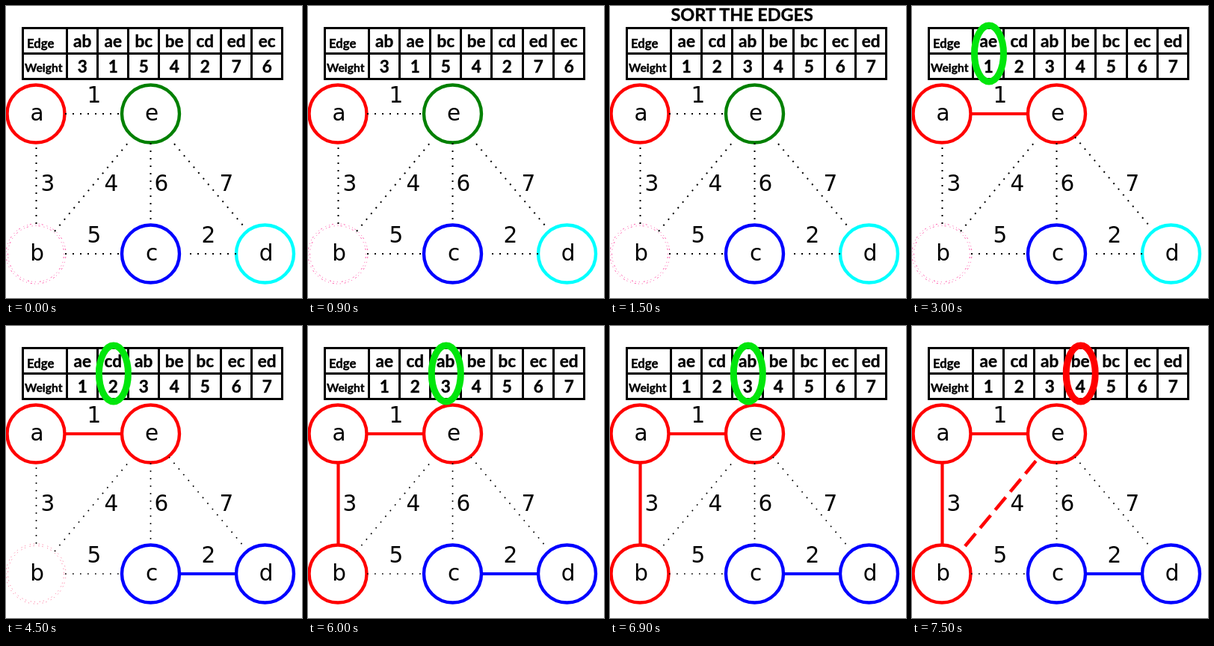
Write an HTML page that moves like this. It is 396 px wide and 390 px high and loops after 8000 ms.

```html
<!DOCTYPE html>
<html lang="en">
<head>
<meta charset="utf-8">
<title>Minimum spanning tree</title>
<style>
  html, body { margin: 0; width: 100%; height: 100%; overflow: hidden; background: #fff; }
  svg { display: block; width: 396px; height: 390px; }
  text { fill: #000; text-anchor: middle; }
  .table text { font: bold 22.5px Lato, "Open Sans", sans-serif; stroke: #000; stroke-width: .4; }
  .table .head { text-anchor: start; }
  .table .title { font-size: 23.4px; }
  .graph text { font: 29.5px "DejaVu Sans", sans-serif; }
  .grid { fill: none; stroke: #000; stroke-width: 3; }
  .node { fill: none; stroke-width: 4.4; }
  .dots { stroke: #000; stroke-width: 2; stroke-dasharray: 2 8; }
  .thin { stroke-width: 1.7; stroke-dasharray: 1.7 8.3; }
  .solid { stroke-width: 4.2; }
  .dashed { stroke: red; stroke-width: 4.5; stroke-dasharray: 22 9.5; }
  .ring { fill: none; stroke-width: 9; }
</style>
</head>
<body>
<svg id="stage" viewBox="0 0 396 390"></svg>
<script>
const LOOP = 8000, STEP = 1500;
const stage = document.getElementById('stage');

const weights = { ab: 3, ae: 1, bc: 5, be: 4, cd: 2, ed: 7, ec: 6 };
const listed = Object.keys(weights);
const sorted = [...listed].sort((p, q) => weights[p] - weights[q]);

const nodes = { a: [40, 144], e: [193.5, 144], b: [40, 331], c: [193.5, 331], d: [346.5, 331] };
const edges = {
  ae: { line: [79, 144, 155, 144], label: [118, 128.5] },
  ab: { line: [40.5, 189, 40.5, 294], label: [56, 247] },
  be: { line: [65, 301, 164, 182], label: [141, 247] },
  ec: { line: [193.5, 183, 193.5, 293], label: [208, 247] },
  ed: { line: [225, 184, 317, 293], label: [295, 247] },
  bc: { line: [79, 331, 155, 331], label: [118, 316] },
  cd: { line: [246, 331, 309, 331], label: [271, 316] }
};
// Step at which an edge joins the tree, with its full line
const joins = {
  ae: { at: 2, color: 'red', line: [79, 144, 155, 144] },
  cd: { at: 3, color: 'blue', line: [232, 331, 308, 331] },
  ab: { at: 4, color: 'red', line: [40.5, 182, 40.5, 293] }
};

const text = (x, y, s, attrs = '') => `<text x="${x}" y="${y}" ${attrs}>${s}</text>`;
const line = ([x1, y1, x2, y2], attrs) =>
  `<line x1="${x1}" y1="${y1}" x2="${x2}" y2="${y2}" ${attrs}/>`;
const circle = ([x, y], r, attrs) => `<circle cx="${x}" cy="${y}" r="${r}" ${attrs}/>`;
const columnX = i => Math.floor(81 + i * 41.2) + 0.5;

function table(step) {
  let grid = 'M22.5 29.5H369.5V97.5H22.5ZM22.5 63.5H369.5', cells = '';
  (step ? sorted : listed).forEach((edge, i) => {
    const mid = columnX(i) + 20.7;
    grid += `M${columnX(i)} 29.5V97.5`;
    cells += text(mid, 54.5, edge) + text(mid, 88.7, weights[edge]);
  });
  const title = step === 1 ? text(176.7, 20, 'SORT THE EDGES', 'class="title"') : '';
  return `<g class="table"><path class="grid" d="${grid}"/>${title}` +
    text(28, 56, 'Edge', 'class="head" style="font-size:16.8px"') +
    text(25, 87.5, 'Weight', 'class="head" style="font-size:15.6px"') + cells + '</g>';
}

function edgeLine(name, step) {
  const join = joins[name];
  if (join && step >= join.at) return line(join.line, `class="solid" stroke="${join.color}"`);
  if (name === 'be' && step === 5) return line([71, 294, 166, 180], 'class="dashed"');
  const ends = name === 'ed' && step >= 2 ? [218, 175, 317, 293] : edges[name].line;
  return line(ends, `class="dots${step >= 3 ? ' thin' : ''}"`);
}

function speckledNode(step) {
  const look = step < 3 ? ['#ff4fa6', '1 3 2 5 1 4'] : ['#ff5c8a', '1 4 1 6'];
  return [37.5, 40].map(r => circle(nodes.b, r,
    `fill="none" stroke="${look[0]}" stroke-width="1" stroke-dasharray="${look[1]}"`)).join('');
}

function graph(step) {
  const colors = {
    a: 'red',
    e: step < 2 ? 'green' : 'red',
    b: step < 4 ? null : 'red',
    c: 'blue',
    d: step < 3 ? 'cyan' : 'blue'
  };
  let out = '';
  for (const [name, at] of Object.entries(nodes)) {
    out += colors[name] ? circle(at, 38.5, `class="node" stroke="${colors[name]}"`) : speckledNode(step);
    out += text(at[0] + 1.5, at[1] + 9, name);
  }
  for (const [name, { label }] of Object.entries(edges)) {
    out += edgeLine(name, step) + text(...label, weights[name]);
  }
  return `<g class="graph">${out}</g>`;
}

function marker(step) {
  if (step < 2) return '';
  const x = 103 + (step - 2) * 40.9;
  return `<ellipse class="ring" cx="${x}" cy="63.5" rx="19.5" ry="37.5" stroke="${step === 5 ? 'red' : '#00e60c'}"/>`;
}

let shown = -1;
function frame() {
  const step = Math.floor((performance.now() % LOOP) / STEP);
  if (step !== shown) {
    shown = step;
    stage.innerHTML = table(step) + graph(step) + marker(step);
  }
  requestAnimationFrame(frame);
}
frame();
</script>
</body>
</html>
```
